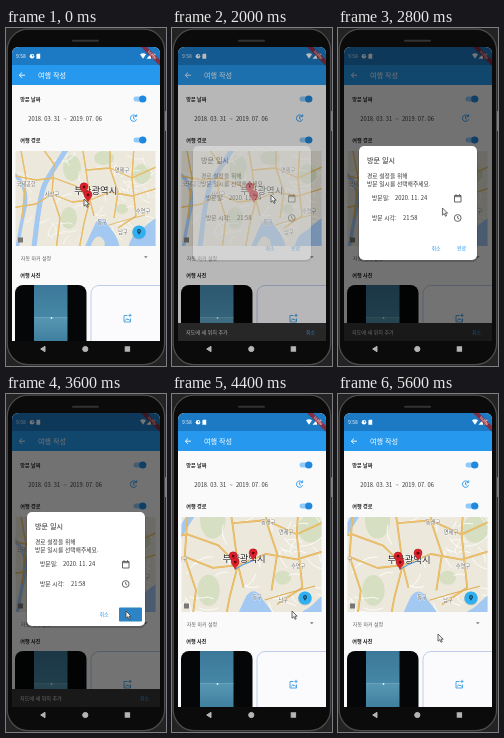
These frames come from a looping animation (160x338 px, 6000 ms). An HTML page:

```html
<!DOCTYPE html>
<html lang="ko">
<head>
<meta charset="utf-8">
<style>
html, body { margin: 0; width: 100%; height: 100%; overflow: hidden; background: #232323; }
svg { display: block; width: 100vw; height: 100vh; }
text { font-family: "Noto Sans CJK KR", "Noto Sans CJK", "Noto Sans", sans-serif; white-space: pre; }
.ic { fill: none; stroke-width: .9; }
</style>
</head>
<body>
<svg viewBox="0 0 160 338">
  <defs>
    <clipPath id="screen"><path d="M6 313V26Q6 19 13 19H147Q154 19 154 26V313Z"/></clipPath>
    <clipPath id="mapBox"><rect x="9.5" y="123" width="140" height="95"/></clipPath>
    <linearGradient id="sky" x2="0" y2="1">
      <stop offset="0" stop-color="#3c7899"/><stop offset=".57" stop-color="#4687a6"/>
      <stop offset=".6" stop-color="#5796b2"/><stop offset="1" stop-color="#3f7f9f"/>
    </linearGradient>
    <g id="pin">
      <path d="M0 6.5C-.6 3.4-4 2-4-1.2A4 4 0 0 1 4-1.2C4 2 .6 3.4 0 6.5Z" fill="#df1f2b" stroke="#9c141c" stroke-width=".5"/>
      <circle cy="-1" r="1.4" fill="#5d090c"/>
    </g>
    <g id="toggle">
      <rect x="127.5" y="-2.5" width="13" height="5" rx="2.5" fill="#90caf9"/>
      <circle cx="136.7" r="3.6" fill="#2089dd"/>
    </g>
    <path id="roads" d="M34 117L48 136L46 166L54 190L50 222M5 147L30 152L48 150L70 158L84 172L88 188M5 180L30 176L46 166L66 174L84 172L104 164L126 168L152 160M76 117L80 142L84 172L78 195L73 222M80 142L104 140L126 150L152 138M104 117L104 140L112 164L108 190M128 117L126 150L130 188L112 200M14 117L20 150L16 190"/>
  </defs>

  <rect width="160" height="338" fill="#232323"/>
  <rect x="158" y="83" width="2" height="20" rx=".6" fill="#b57d61"/>
  <rect x="1.2" y="1.2" width="157.4" height="335.4" rx="21" fill="#0b0b0b" stroke="#4c4c4c" stroke-width="1.3"/>
  <rect x="66" y="11.8" width="27" height="2" rx="1" fill="#333"/>

  <g clip-path="url(#screen)">
    <rect x="6" y="19" width="148" height="294" fill="#fafafa"/>
    <rect x="6" y="19" width="148" height="19" fill="#1c7ac4"/>
    <rect x="6" y="37" width="148" height="20" fill="#2699ee"/>
    <g fill="#fff">
      <text x="10" y="30.2" font-size="5" font-weight="500">9:58</text>
      <circle cx="26" cy="28.3" r="2.3"/><circle cx="26.6" cy="27.8" r=".8" fill="#1c7ac4"/>
      <path d="M31.2 25.8H34.2V30.8H30.4V26.6Z"/>
      <path d="M134 26.3Q137 24.3 140 26.3L137 30.8Z"/>
      <path d="M140.5 30.8H145V25.8Z"/>
      <rect x="146.5" y="25.8" width="2.6" height="5" rx=".4"/>
      <text x="32" y="50" font-size="7.1" font-weight="500">여행 작성</text>
    </g>
    <path class="ic" d="M19 47.2H13.5M16 44.5L13.3 47.2L16 49.9" stroke="#fff"/>

    <g fill="#222" font-size="5.1" font-weight="700">
      <text x="14.3" y="73">방문 날짜</text>
      <text x="14.3" y="114">여행 경로</text>
      <text x="14.3" y="249">여행 사진</text>
    </g>
    <use href="#toggle" y="71"/>
    <use href="#toggle" y="112"/>
    <text x="22.3" y="92.6" font-size="5.75" fill="#333">2018. 03. 31  ~  2019. 07. 06</text>
    <path class="ic" d="M130 88A3.2 3.2 0 1 0 130.6 91.4M130.7 86.4V88.6H128.5M127.5 88.4V90.4L128.9 91.3" stroke="#2196f3"/>

    <g clip-path="url(#mapBox)">
      <rect x="9" y="123" width="141" height="95" fill="#ece8dc"/>
      <g id="geo">
        <g fill="#d6dfc2">
          <ellipse cx="66" cy="140" rx="9" ry="13"/>
          <ellipse cx="98" cy="130" rx="10" ry="7"/>
          <ellipse cx="63" cy="190" rx="8" ry="11"/>
          <ellipse cx="136" cy="146" rx="9" ry="10"/>
          <ellipse cx="116" cy="181" rx="6" ry="5"/>
        </g>
        <path id="lanes" fill="none" stroke="#fff" stroke-width=".6"/>
        <g fill="none" stroke="#a3c8f2">
          <path d="M66 110C57 130 45 142 38 158C32 175 31 198 27 226" stroke-width="5"/>
          <path d="M2 142C17 150 23 165 18 184C14 200 13 212 10 226" stroke-width="3.5"/>
        </g>
        <g fill="#a3c8f2">
          <path d="M76 225C82 212 86 202 90 194C95 188 99 191 102 197C106 203 112 207 115 225Z"/>
          <path d="M165 186C146 188 141 198 134 203C127 206 124 211 121 225H165Z"/>
        </g>
        <path d="M85 217Q90 205 96 210Q102 216 95 222H86Z" fill="#e7e3d5"/>
        <g fill="none" stroke-linejoin="round">
          <use href="#roads" stroke="#dfae52" stroke-width="1.3"/>
          <use href="#roads" stroke="#f2c978" stroke-width=".6"/>
          <path d="M103 197L120 192L139 187" stroke="#dfae52" stroke-width=".8"/>
        </g>
      </g>
      <g id="labels" text-anchor="middle" stroke="#fff" stroke-width="1" stroke-opacity=".75" paint-order="stroke" stroke-linejoin="round"></g>
      <path id="route" fill="none" stroke="#3c8ee6" stroke-width="1"/>
      <g id="pins"></g>
      <rect x="12" y="209.5" width="5" height="5" fill="#777"/>
      <g id="fab">
        <circle r="7" cy=".6" fill="#000" opacity=".15"/>
        <circle r="6.6" fill="#2fb0f0"/>
        <path d="M0 3C-.5 1.5-2 .6-2-.9A2 2 0 0 1 2-.9C2 .6.5 1.5 0 3Z" fill="#17405f"/>
        <circle cy="-.9" r=".8" fill="#2fb0f0"/>
      </g>
    </g>

    <text x="14.8" y="231.8" font-size="5" fill="#666">자동 마커 설정</text>
    <path d="M138 228.3H141.6L139.8 230.2Z" fill="#777"/>

    <rect x="9" y="257" width="71.5" height="68" rx="8" fill="#050607"/>
    <rect x="28" y="257" width="33.5" height="56" fill="url(#sky)"/>
    <path d="M28 289.5H61.5" stroke="#8ab6cb" stroke-width=".5"/>
    <circle cx="45.5" cy="290" r=".9" fill="#e9f3f5"/>
    <rect x="85" y="257.5" width="84" height="70" rx="8" fill="#fbfbfd" stroke="#bfcdeb"/>
    <path class="ic" d="M121.5 287.5H118V294H124.5V290.5M119 292.8L120.8 290.6L122 292L122.7 291.2L124 292.8M124 285.8V289M122.4 287.4H125.6" stroke="#3f9de0"/>

    <g id="snack">
      <rect x="6" y="295" width="148" height="19" fill="#363636"/>
      <g id="snackText">
        <text x="14" y="305.8" font-size="5.1" fill="#eee">지도에 새 위치 추가</text>
        <text x="134" y="305.8" font-size="5" fill="#42a5f5">취소</text>
      </g>
    </g>
    <path d="M135 19H141L154 32V38Z" fill="#a3161e" fill-opacity=".75"/>
    <text transform="translate(146 27) rotate(45)" text-anchor="middle" y="1" font-size="3.2" font-weight="700" fill="#fff" fill-opacity=".7">DEBUG</text>

    <rect id="shade" x="6" y="19" width="148" height="294" fill="#000"/>
    <g id="dialog">
      <rect x="20.5" y="119" width="119" height="115" rx="5" fill="#000" opacity=".2"/>
      <rect x="21" y="118" width="118" height="114" rx="5" fill="#fff"/>
      <text x="29" y="134.7" font-size="7.1" font-weight="500" fill="#222">방문 일시</text>
      <g font-size="5.8" fill="#333">
        <text x="29" y="150">경로 설정을 위해</text>
        <text x="29" y="158.2">방문 일시를 선택해주세요.</text>
        <text x="34" y="172.2">방문일:</text>
        <text x="57" y="172.2">2020. 11. 24</text>
        <text x="34" y="192.2">방문 시각:</text>
        <text x="65" y="192.2">21:58</text>
      </g>
      <path class="ic" d="M116.5 167.5H123V174H116.5ZM116.5 168.7H123M118 166.2V167.5M121.5 166.2V167.5" stroke="#555"/>
      <path class="ic" d="M123.1 190A3.4 3.4 0 1 1 116.3 190A3.4 3.4 0 1 1 123.1 190M119.7 188V190.2L121.2 191.2" stroke="#555"/>
      <rect id="press" x="113" y="213.5" width="23" height="14" rx="1" fill="#2d83c4"/>
      <g font-size="5" fill="#2196f3">
        <text x="93.5" y="222">취소</text>
        <text x="119" y="222">완료</text>
      </g>
    </g>
  </g>

  <g fill="#b5b5b5" stroke="#b5b5b5">
    <path d="M39 318.3L34.7 321L39 323.7Z"/>
    <circle cx="79.3" cy="321" r="2.6"/>
    <rect x="119.2" y="318.8" width="4.4" height="4.4"/>
  </g>
  <path id="cursor" d="M0 0V7.2L1.8 5.7L3 8.3L4.2 7.8L3 5.2H5.2Z" fill="#eee" stroke="#333" stroke-width=".7"/>
</svg>
<script>
const LOOP = 6000, STEP = 100;
const $ = id => document.getElementById(id);
const clamp = v => Math.max(0, Math.min(1, v));
const mix = (a, b, k) => a + (b - a) * k;
const ramp = (t, from, to) => clamp((t - from) / (to - from));
const smooth = k => k * k * (3 - 2 * k);
const outQuart = k => 1 - (1 - k) ** 4;

// text, size, weight, wide view x/y, close view x/y
const labels = [
  ["부산광역시", 9.4, 500, 89.7, 166.3, 82, 167.3],
  ["연제구", 5.2, 400, 116, 144, 124, 139],
  ["수영구", 5.2, 400, 137, 185, 136, 173],
  ["사상구", 5.2, 400, 46, 168, 18, 166],
  ["국제공항", 5.2, 400, 20, 158, -30, 156],
  ["동구", 5.2, 400, 96, 196, 95, 204],
  ["남구", 5.2, 400, 117, 206, 121, 207],
  ["동래구", 5.2, 400, 101, 121, 106, 129]
].map(([str, size, weight, ...pos]) => {
  const el = make("text", $("labels"));
  el.textContent = str;
  el.setAttribute("font-size", size);
  el.setAttribute("font-weight", weight);
  el.setAttribute("fill", size > 6 ? "#222" : "#666");
  return { el, pos };
});

const pins = [
  [99, 158, 91, 159],
  [78, 160, 71, 162],
  [82, 168, 73, 168]
].map(pos => {
  const el = make("use", $("pins"));
  el.setAttribute("href", "#pin");
  return { el, pos };
});

// time, tip x, tip y
const path = [
  [0, 78, 171], [700, 128, 200], [1400, 128, 200], [1600, 99, 167],
  [2600, 99, 167], [3200, 120, 217], [4800, 120, 217], [5200, 108, 245],
  [5300, 108, 245], [5600, 100, 240]
];

function make(tag, parent) {
  return parent.appendChild(document.createElementNS("http://www.w3.org/2000/svg", tag));
}

function layLanes() {
  let seed = 11, d = "";
  const rnd = () => (seed = seed * 16807 % 2147483647) / 2147483647;
  for (let i = 0; i < 70; i++) {
    const x = mix(5, 150, rnd()), y = mix(115, 215, rnd());
    const a = rnd() * 6.3, len = 6 + rnd() * 12;
    d += `M${x} ${y}q${len * Math.cos(a + .5) / 2} ${len * Math.sin(a + .5) / 2} ${len * Math.cos(a)} ${len * Math.sin(a)}`;
  }
  $("lanes").setAttribute("d", d);
}

function move(el, x, y, scale = 1) {
  el.setAttribute("transform", `translate(${x} ${y}) scale(${scale})`);
}

function drawMap(t) {
  const zoom = smooth(ramp(t, 3600, 4000));
  const pan = outQuart(ramp(t, 4100, 4800));
  const dx = -11 * pan, dy = 1.2 * pan;
  const at = ([ax, ay, bx, by]) => [mix(ax, bx, zoom) + dx, mix(ay, by, zoom) + dy];
  const s = mix(1, 1.4, zoom);
  $("geo").setAttribute("transform",
    `translate(${mix(82, 73, zoom) + dx} ${mix(172, 170, zoom) + dy}) scale(${s}) translate(-82 -172)`);
  for (const { el, pos } of [...labels, ...pins]) move(el, ...at(pos));
  const shown = t >= 3700 ? "" : "none";
  pins[0].el.style.display = $("route").style.display = shown;
  const [x0, y0] = at(pins[2].pos), [x1, y1] = at(pins[0].pos);
  $("route").setAttribute("d", `M${x0} ${y0 + 6}Q${x0 + 8} ${y0 + 1} ${x1} ${y1 + 6.5}`);
}

function drawCursor(t) {
  let i = 0;
  while (i < path.length - 2 && t >= path[i + 1][0]) i++;
  const [t0, x0, y0] = path[i], [t1, x1, y1] = path[i + 1];
  const k = smooth(ramp(t, t0, t1));
  move($("cursor"), mix(x0, x1, k), mix(y0, y1, k));
}

function draw(t) {
  drawMap(t);
  drawCursor(t);
  move($("fab"), 133, 204, 1 - ramp(t, 800, 1100) + ramp(t, 3700, 4000));
  const up = smooth(ramp(t, 900, 1300)) - smooth(ramp(t, 3700, 4000));
  move($("snack"), 0, 18 * (1 - up));
  $("snackText").setAttribute("opacity", ramp(t, 1100, 1400));
  const open = ramp(t, 1900, 2100) - ramp(t, 3700, 3900);
  $("shade").setAttribute("opacity", .54 * open);
  const shown = 1 - (1 - ramp(t, 1900, 2300)) ** 1.7 - ramp(t, 3600, 3900);
  $("dialog").setAttribute("opacity", clamp(shown));
  $("press").setAttribute("opacity", t >= 3500 && t < 3900 ? 1 : 0);
}

function tick() {
  const t = performance.now() % LOOP;
  draw(Math.floor(t / STEP) * STEP);
  requestAnimationFrame(tick);
}

layLanes();
tick();
</script>
</body>
</html>
```
